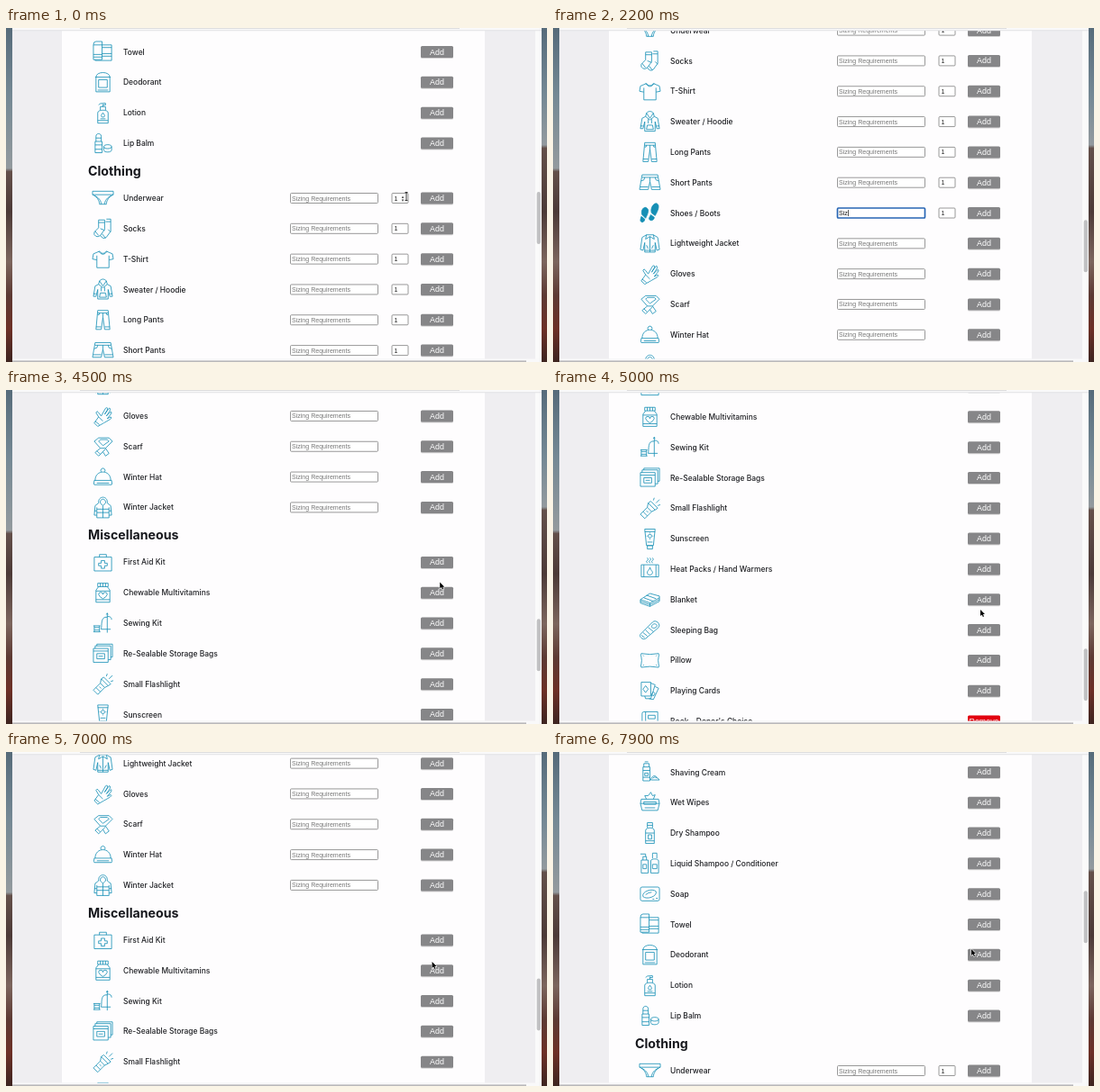
An HTML page with a canvas for the animation above (8 s loop, 600 by 371 pixels).

```html
<!DOCTYPE html>
<html lang="en">
<head>
<meta charset="utf-8">
<title>Supply list</title>
<style>
html, body { margin: 0; width: 100%; height: 100%; overflow: hidden; background: #fff; }
canvas { display: block; width: 600px; height: 371px; }
</style>
</head>
<body>
<canvas id="stage"></canvas>
<script>
const W = 600, H = 371, LOOP = 8000, STEP = 100, PITCH = 33.82;
const TEAL = '#168fb5';
const canvas = document.getElementById('stage');
const ctx = canvas.getContext('2d');
const dpr = window.devicePixelRatio || 1;
canvas.width = W * dpr;
canvas.height = H * dpr;

// Icon outlines, drawn around (0, 0).
const icons = {
  'Shaving Cream': 'M-8-6H0V10H-8ZM-7-6V-10H-1V-6M-6-12H-2M-8-2H0M-8 6H0M-6 1H-2V4H-6ZM1 9C2 4 6 3 8 6L11 9ZM3 7Q6 4 8 7',
  'Wet Wipes': 'M-10-4H10L11 1 9 9H-9L-11 1ZM-7-1H7V2H-7ZM-4-4L-6-8-2-8 1-12 3-8 6-9 4-4M-11 1H11M-6 6H6',
  'Dry Shampoo': 'M-5-3C-5-7 5-7 5-3V12H-5ZM-3-6V-12H3V-6M-3-9H3M-5 0H5M-5 9H5M-2 2H2V7H-2Z',
  'Liquid Shampoo / Conditioner': 'M-10-4H-2V11H-10ZM-8-4V-8H-4V-4M-11-11H-5V-8M1-3C1-6 10-6 10-3V11H1ZM3-6V-12H8V-6M-8 1H-4V6H-8ZM3 1H8V6H3Z',
  'Soap': 'M-9-8H9Q11-8 11-6V6Q11 8 9 8H-9Q-11 8-11 6V-6Q-11-8-9-8ZM-8 3C-10-3 3-7 7-3 9 3-4 7-8 3M-5 1Q-2-2 2-2M7 5H9M3 6H5',
  'Towel': 'M-11-8Q-11-12-8-12H-1V9H-11ZM-11-8H-1M-11 3H-1M-11 6H-1M-1-8H10V10H-9V9M-1 2H10M-1 5H10M-1-5H10',
  'Deodorant': 'M-8-6C-8-13 8-13 8-6V11H-8ZM-9-6H9M-5-3H5V6H-5ZM-6 9H6',
  'Lotion': 'M-6 0C-6-4 6-4 6 0V12H-6ZM-3-3V-7H3V-3M0-7V-10M-5-9Q-4-11 0-11H3V-9H0M-6 9H6M0 0Q-4 5 0 5 4 5 0 0M-3 7H3',
  'Lip Balm': 'M-9-2H-1V11H-9ZM-8-2V-8C-8-12-2-12-2-8V-2M-8-6H-2M-9 2H-1M-9 7H-1M1 4C1 1 10 1 10 4V8C10 11 1 11 1 8ZM1 4C1 7 10 7 10 4',
  'Underwear': 'M-12-8H12V-4H-12ZM-12-4C-7-2-4 3-4 7H4C4 3 7-2 12-4M-10-3C-5-1-2 3-2 7M10-3C5-1 2 3 2 7',
  'Socks': 'M-5-10H2V1L-3 8Q-7 11-10 7-11 4-8 2L-5-1ZM-5-7H2M-9 3L-5 8M-3 0L2 2M4-11H9V3L4 10Q0 13-3 8M3-8H9M6 1L9 4M-1 6L3 11',
  'T-Shirt': 'M-4-9L-11-6-12 0-7 1V10H7V1L12 0 11-6 4-9Q0-4-4-9ZM-7-4V1M7-4V1M-5-9Q0-2 5-9',
  'Sweater / Hoodie': 'M-4-10Q0-14 4-10L5-6 9-4 11 8H8L6 0V11H-6V0L-8 8H-11L-9-4-5-6ZM-4-10L0-4 4-10M-5-6L0-2 5-6M-2-3V2M2-3V2M-4 9L-3 4H3L4 9ZM-11 5H-8M8 5H11',
  'Long Pants': 'M-6-11H6L8 11H2L0-3-2 11H-8ZM-6-8H6M0-8V-3M-6-6Q-4-5-4-8M6-6Q4-5 4-8M-8 8H-2M2 8H8',
  'Short Pants': 'M-9-9H9L12 8H2L0-1-2 8H-12ZM-9-6H9M0-6V-1M-10-2Q-6-2-6-6M10-2Q6-2 6-6M-11 5H-2M2 5H11',
  'Shoes / Boots': 'M-9 2C-11-3-7-8-4-6 0-4-3 2-5 6ZM-10 4L-6 7C-6 11-11 12-11 8ZM2 0C0-5 4-12 8-11 12-9 9-2 6 3ZM1 2L5 5C5 9-1 10-1 6Z',
  'Lightweight Jacket': 'M-4-10H4L9-7 11 7 8 8 6-1V10H-6V-1L-8 8-11 7-9-7ZM0-8V10M-4-10L-5-5 0-8 5-5 4-10M-4 2L-2 6M4 2L2 6M-6 8H6',
  'Gloves': 'M-10 8L-5 1-8-4Q-7-7-5-4L-2 0 3-9Q6-11 5-7L2-2 7-9Q9-10 8-6L4 0 9-5Q11-5 9-2L5 3 9 1Q11 2 8 4L1 8-6 12ZM-9 6L-4 10M-5 1L0 6',
  'Scarf': 'M-10-6L-5-10H7L11-6 3 2-3 2ZM-5-6L-3-8H5L7-6 0-1ZM-3 2L-9 7-5 11 3 3M3 2L7 8 3 11 0 6M-7 5L-3 9',
  'Winter Hat': 'M-9 4C-9-9 9-9 9 4M-10 4H10Q11 9 10 9H-10Q-11 9-10 4M-2-6A2.5 2.5 0 1 1 2-6M-7 7H7',
  'Winter Jacket': 'M-5-5C-6-14 6-14 5-5L9-2 10 9H7V12H-7V9H-10L-9-2ZM-3-5C-4-11 4-11 3-5L0-2ZM0-2V12M-7 0V9M7 0V9M-7 2H7M-7 6H7M-10 4H-7M7 4H10',
  'First Aid Kit': 'M-10-6H10V10H-10ZM-4-6V-9H4V-6M-2-2H2V1H5V4H2V7H-2V4H-5V1H-2Z',
  'Chewable Multivitamins': 'M-6-11H6V-7H-6ZM-5-7L-8-3V11H8V-3L5-7M-8-2H8M-8 8H8M-5 2A2.5 2.5 0 1 1 0 2 2.5 2.5 0 1 1 5 2Q4 5 0 7-4 5-5 2M-3-11V-7M0-11V-7M3-11V-7',
  'Sewing Kit': 'M-11 3H-3M-11 10H-3M-10 3V10M-4 3V10M-10 5H-4M-10 8H-4M5-12V11M4-10Q5-13 6-10M5-7C-3-8-1 2-2 7H9M5-8Q10-8 10-4',
  'Re-Sealable Storage Bags': 'M-11-6H6V10H-11ZM-11-3H6M-9-6V-9H9V7H6M-7-9V-11H11V4H9M-7 0H2V6H-7ZM-5 3H0',
  'Small Flashlight': 'M-11 7L-3-1 2 4-6 12ZM-3-1L-2-6 6 2 2 4M-2-6L1-8 9 0 6 2M-8 4L-3 9M-4 3L-2 5M4-9L5-12M7-6L11-10M9-3L12-4',
  'Sunscreen': 'M-6-11H6L4 8H-4ZM-3 8H3V12H-3ZM-6-8H6M-2-3A2 2 0 1 1 2-3 2 2 0 1 1-2-3M0-6V-7M0 0V1M-3-3H-4M3-3H4M-3 4H3',
  'Heat Packs / Hand Warmers': 'M-10-5H10V9H-10ZM-7-5V9M7-5V9M0-2C0 1-4 2-3 5-2 8 3 7 3 4 3 2 1 2 0-2M-3-7Q-5-9-3-10T-3-13M0-7Q-2-9 0-10T0-13M3-7Q1-9 3-10T3-13',
  'Blanket': 'M-11 0L0-7 11-4V2L0 8-11 4ZM-11 0L0 4 11-2M0 4V8M-11 2L0 6 11 0M-7-2L4 2M-4-5L7-1',
  'Sleeping Bag': 'M-11 5L3-9C7-13 14-6 9-2L-5 10C-8 12-13 8-11 5ZM3-6C6-9 10-5 7-3 4-1 0-3 3-6M-8 3L-3 7M-5 0L0 5M-2-3L4 2M-10 6L-6 9',
  'Pillow': 'M-10-8Q0-6 10-8 11-6 10-4 9 0 10 4 11 7 10 8 0 6-10 8-11 6-10 4-9 0-10-4-11-6-10-8ZM-8-6L-7-5M8-6L7-5M-8 6L-7 5M8 6L7 5',
  'Playing Cards': 'M-10-10H1V6H-10ZM1-9L6-7 1 9H-5L-6 6M6-5L10-3 4 10-1 9M-5-6L-2-2-5 2-8-2ZM4 1L6 3 4 6 2 4Z',
  "Book - Donor's Choice": 'M-9-9Q-9-11-7-11H9V7H-7Q-9 7-9 9-9 11-7 11H9V7M-9-9V9M-5-11V7M-2-7H6V-3H-2ZM-7 9H9',
  'Pens / Pencils': 'M-8-8L-6-12-3-8V7L-6 11-8 7ZM-8-5H-3M-8 5H-3M-6-5V5M0-10H6V8L3 12 0 8ZM0-6H6M0 5H6M6-9H8V0M2-6V5M4-6V5',
  'Notebook': 'M-8-10H7V10H-8ZM-10-7H-7M-10-3H-7M-10 1H-7M-10 5H-7M-4-6H4M-4-3H4M-4 0H4M-4 3H2M-4 6H0M10-8L12-6 5 7 3 8V5Z',
};
const shapes = {};
for (const name in icons) shapes[name] = new Path2D(icons[name]);

// Page rows: y = 0 is the top of the stage when scroll is 0.
const names = Object.keys(icons);
const iCloth = names.indexOf('Underwear'), iShoes = names.indexOf('Shoes / Boots'), iMisc = names.indexOf('First Aid Kit');
const rows = names.map((name, i) => ({
  name,
  y: i < iCloth ? 26.5 + (i - 5) * PITCH : i < iMisc ? 189 + (i - iCloth) * PITCH : 622 + (i - iMisc) * PITCH,
  sizing: i >= iCloth && i < iMisc,
  count: i >= iCloth && i <= iShoes,
}));

const scrollKeys = [[100, 0], [600, 186.4], [4250, 186.4], [5000, 626], [5300, 626], [5950, 731.6], [6650, 731.6], [7500, 244.6], [7900, -165]];
const mouseX = [[100, 444], [600, 451], [700, 451], [950, 410], [1150, 330], [3100, 330], [3650, 483], [4300, 483], [5000, 474], [6000, 477], [7500, 471], [7900, 464]];
const mouseY = [[100, 187], [600, 204], [3100, 204], [3650, 206], [4300, 206], [5000, 244], [6000, 250], [7500, 227], [7900, 219]];
const FOCUS = 1500, TYPE = 1900, HOVER = 3600, CLICK = 4000;
const VALUE = 'Size 11';

const smooth = p => p * p * (3 - 2 * p);
const easeOut = p => 1 - (1 - p) ** 2;

function track(keys, t, ease) {
  if (t <= keys[0][0]) return keys[0][1];
  for (let i = 1; i < keys.length; i++) {
    const [t0, a] = keys[i - 1], [t1, b] = keys[i];
    if (t <= t1) return a + (b - a) * ease((t - t0) / (t1 - t0));
  }
  return keys[keys.length - 1][1];
}

function rect(x, y, w, h, color) {
  ctx.fillStyle = color;
  ctx.fillRect(x, y, w, h);
}

function round(x, y, w, h, r) {
  ctx.beginPath();
  ctx.roundRect(x, y, w, h, r);
}

function text(str, x, y, font, color, align = 'left') {
  ctx.font = font;
  ctx.fillStyle = color;
  ctx.textAlign = align;
  ctx.fillText(str, x, y);
}

const LABEL = '500 8.45px Inter, sans-serif';
const HEADING = '700 14.2px Inter, sans-serif';
const BUTTON = '8.9px "Liberation Sans", Arial, sans-serif';
const FIELD = '7.05px "Liberation Sans", Arial, sans-serif';

// A strip of desert: sky down to the horizon, then layered rock.
function drawDesert(x, horizon) {
  const g = ctx.createLinearGradient(0, 0, 0, H);
  const stops = [[0, '#566b7a'], [0.2, '#748894'], [horizon, '#939a9e'], [horizon + 0.01, '#64504a'], [0.55, '#4c3a37'], [0.7, '#7c655d'], [0.8, '#5d3a33'], [0.9, '#6d3026'], [1, '#3d2420']];
  stops.forEach(([p, c]) => g.addColorStop(p, c));
  rect(x, 0, 8, H, g);
}

function drawField(x, y, w, focused) {
  round(x + 0.5, y - 5.5, w - 1, 11, 1);
  ctx.fillStyle = '#fff';
  ctx.fill();
  ctx.lineWidth = focused ? 1.7 : 0.9;
  ctx.strokeStyle = focused ? '#2765b4' : '#8d8d8d';
  ctx.stroke();
}

function drawButton(y, label, color) {
  round(460, y - 5.5, 36, 13, 1.5);
  ctx.fillStyle = 'rgba(0,0,0,0.16)';
  ctx.fill();
  round(460, y - 6.5, 36, 13, 1.5);
  ctx.fillStyle = color;
  ctx.fill();
  text(label, 478, y + 3, BUTTON, '#fff', 'center');
}

function drawIcon(row, y) {
  ctx.save();
  ctx.translate(107.5, y);
  ctx.scale(0.96, 0.96);
  ctx.lineWidth = 0.85;
  ctx.lineJoin = 'round';
  ctx.strokeStyle = ctx.fillStyle = TEAL;
  if (row.name === 'Shoes / Boots') ctx.fill(shapes[row.name]);
  ctx.stroke(shapes[row.name]);
  ctx.restore();
}

function drawRow(row, y, t) {
  const shoes = row.name === 'Shoes / Boots';
  drawIcon(row, y);
  text(row.name, 130, y + 3.1, LABEL, '#1f2024');
  if (row.sizing) {
    const focused = shoes && t >= FOCUS && t < CLICK + 100;
    const typed = shoes ? VALUE.slice(0, Math.max(0, Math.floor((t - TYPE) / 150) + 1)) : '';
    drawField(315, y, 98, focused);
    text(typed || 'Sizing Requirements', 317, y + 2.5, FIELD, typed ? '#111' : '#777');
    if (focused && t < 3100 && t % 1000 < 500) {
      rect(317.5 + ctx.measureText(typed).width, y - 3.5, 0.7, 7, '#111');
    }
  }
  if (row.count) {
    drawField(427.5, y, 19, false);
    text('1', 430.5, y + 2.5, FIELD, '#222');
    if (row.name === 'Underwear' && t < 150) {
      text('▴', 440, y, '5px "DejaVu Sans", sans-serif', '#444', 'center');
      text('▾', 440, y + 4, '5px "DejaVu Sans", sans-serif', '#444', 'center');
    }
  }
  const taken = row.name.startsWith('Book') || (shoes && t >= CLICK);
  const hover = shoes && t >= HOVER;
  drawButton(y, taken ? 'Remove' : 'Add', taken ? '#e2000f' : hover ? '#0d8ab5' : '#868688');
}

function drawFooter(y) {
  const partners = [['Sharing Harmonia', 139], ['Town Gleaning', 243], ['Aid Land', 359], ['Alliance for the Unhoused', 454]];
  for (const [name, x] of partners) text(name, x, y + 4, '500 7px Inter, sans-serif', '#333', 'center');
  ctx.beginPath();
  ctx.arc(300, y + 4, 9, 0, 7);
  ctx.fillStyle = TEAL;
  ctx.fill();
}

const arrow = new Path2D('M0 0V7L1.7 5.5 2.8 8 4 7.5 2.9 5.1H5Z');
const hand = new Path2D('M0 0Q1 -1 1.7 0V3L5 4V7L4 9H0L-2.5 5.5Q-2.5 4.5-1 5L0 6Z');
const ibeam = new Path2D('M-1.5-4.5H1.5M0-4.5V4.5M-1.5 4.5H1.5');

function drawCursor(t) {
  if (t >= TYPE && t < 3100) return;
  const x = track(mouseX, t, smooth), y = track(mouseY, t, smooth);
  const overField = t < 150 || (t > 700 && t < HOVER && x < 413);
  ctx.save();
  ctx.translate(x, y);
  ctx.lineJoin = 'round';
  if (overField) {
    ctx.lineWidth = 0.9;
    ctx.strokeStyle = '#222';
    ctx.stroke(ibeam);
  } else {
    const isHand = t >= HOVER && t < 4300;
    ctx.lineWidth = 1.2;
    ctx.strokeStyle = isHand ? '#111' : '#fff';
    ctx.fillStyle = isHand ? '#fff' : '#000';
    ctx.stroke(isHand ? hand : arrow);
    ctx.fill(isHand ? hand : arrow);
  }
  ctx.restore();
}

function draw(t) {
  const scroll = track(scrollKeys, t, easeOut);
  ctx.setTransform(dpr, 0, 0, dpr, 0, 0);
  drawDesert(0, 0.42);
  drawDesert(592, 0.35);
  rect(7, 0, 587, H, '#f9f9fa');

  ctx.save();
  ctx.beginPath();
  ctx.rect(7, 3, 587, 364.5);
  ctx.clip();
  rect(7, 3, 580, 365, '#efeef1');
  rect(62, 3, 469, Math.min(365, 1080.6 - scroll), '#fefdfe');
  for (const [title, y] of [['Clothing', 159], ['Miscellaneous', 592]]) {
    text(title, 91, y + 5 - scroll, HEADING, '#17181d');
  }
  for (const row of rows) {
    const y = row.y - scroll;
    if (y > -20 && y < H + 20) drawRow(row, y, t);
  }
  drawFooter(1099.6 - scroll);
  rect(587, 3, 7, 365, '#fafafa');
  round(588.7, 182 + scroll / 5.95, 4.2, 58, 2.1);
  ctx.fillStyle = '#c1c1c3';
  ctx.fill();
  ctx.restore();

  rect(7, 2.4, 587, 0.8, '#dcdcde');
  rect(82, 0, 421, 0.8, '#d5d5d8');
  rect(7, 369.4, 570, 1.6, '#b9b8ba');
  drawCursor(t);
}

function frame(now) {
  const t = now % LOOP;
  draw(t - t % STEP);
  requestAnimationFrame(frame);
}
requestAnimationFrame(frame);
</script>
</body>
</html>
```
